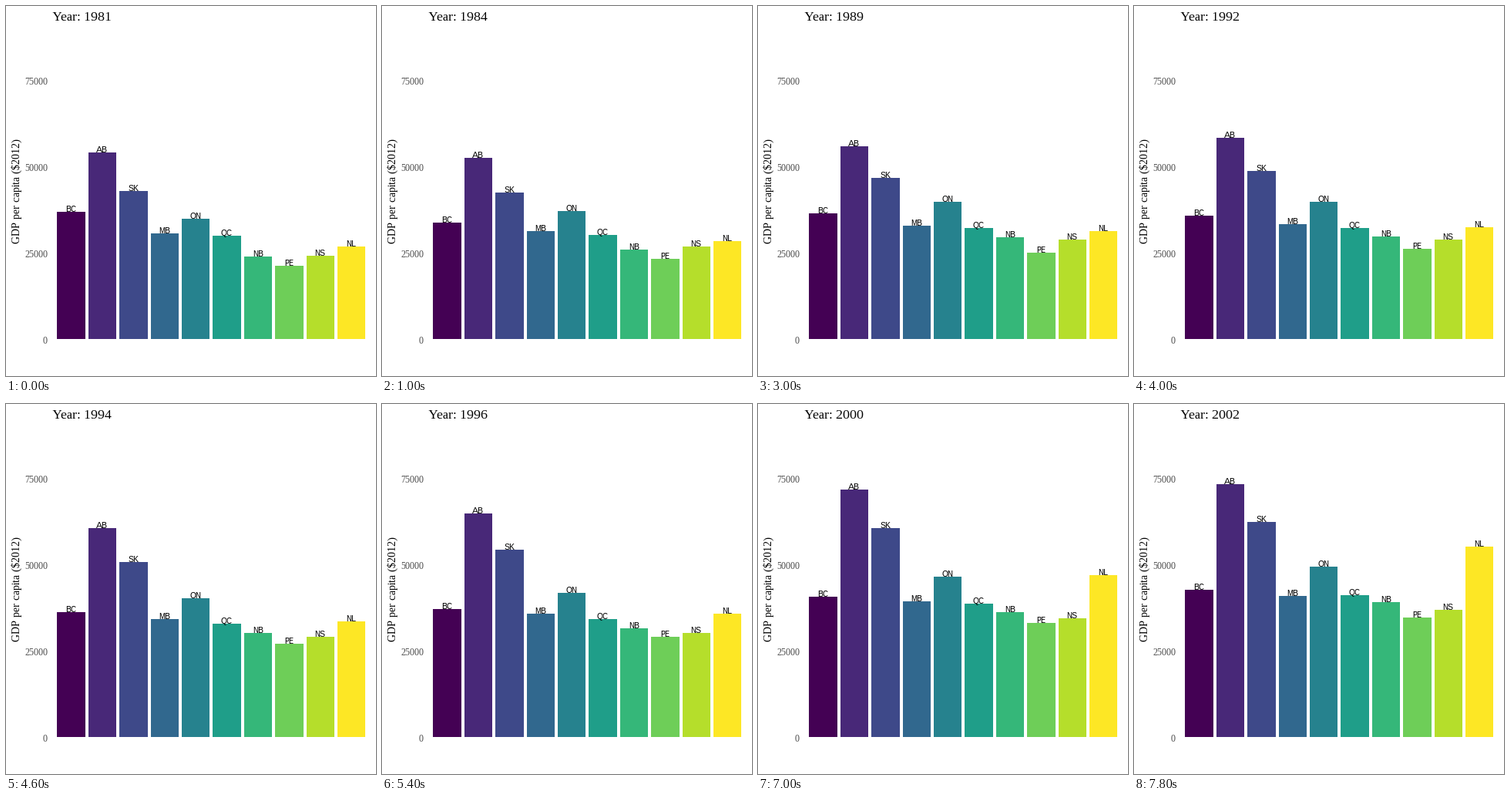
Write a matplotlib script that moves like this. It is 480 by 480 pixels and loops after 8 s.

```python
from math import ceil

import numpy as np
import matplotlib.pyplot as plt
from matplotlib.animation import FuncAnimation
from matplotlib.patches import Rectangle

# Whole-pixel glyphs with almost no kerning.
plt.rcParams.update({"text.hinting": "native", "text.hinting_factor": 1,
                     "text.kerning_factor": 6})

SIZE, DPI = 480, 80
FRAMES, STEP_MS = 40, 200
YEARS_PER_FRAME = 38 / 69
BASE = 432                      # y of the zero line, in pixels
FIRST_X, PITCH = 84.17, 40.39   # first bar centre and bar spacing
BAR_W = 0.9 * PITCH

# Bar heights in pixels at the turning points of the economy.
TURNS = [0, 5, 11, 31, 39]
HEIGHTS = {
    "BC": [165, 151, 167, 173, 191],
    "AB": [242, 235, 245, 314, 328],
    "SK": [192, 190, 204, 263, 279],
    "MB": [137, 140, 148, 170, 183],
    "ON": [156, 166, 181, 196, 221],
    "QC": [134, 135, 145, 162, 184],
    "NB": [107, 116, 133, 149, 175],
    "PE": [95, 104, 110, 140, 155],
    "NS": [108, 120, 131, 142, 165],
    "NL": [120, 127, 137, 173, 247],
}


def arch(k, start, end):
    """Half a sine wave between two frames, zero elsewhere."""
    return np.sin(np.pi * np.clip((k - start) / (end - start), 0, 1))


def bar_height(name, k):
    """Steady growth between turning points, less two shared recessions."""
    slump = 0.03 * arch(k, 0, 5) + 0.055 * arch(k, 11, 31)
    return np.interp(k, TURNS, HEIGHTS[name]) * (1 - slump)


fig = plt.figure(figsize=(SIZE / DPI, SIZE / DPI), dpi=DPI, facecolor="white")
ax = fig.add_axes([0, 0, 1, 1])
ax.set_xlim(0, SIZE)
ax.set_ylim(SIZE, 0)
ax.axis("off")


def put_text(x, y, text, px, font="Liberation Serif", **style):
    return ax.text(x, y, text, fontsize=px * 72 / DPI, family=font,
                   va="baseline", **style)


title = put_text(60, 19, "", 17)
put_text(18.5, 239.5, r"GDP per capita (\$2012)", 14, ha="center",
         rotation=90, rotation_mode="anchor")
for i in range(4):
    put_text(54, 438 - 112 * i, str(25000 * i), 12, ha="right",
             color="#4D4D4D")

bars, labels = {}, {}
colors = plt.cm.viridis(np.linspace(0, 1, len(HEIGHTS)))
for i, (name, color) in enumerate(zip(HEIGHTS, colors)):
    x = FIRST_X + PITCH * i
    left, right = ceil(x - BAR_W / 2), ceil(x + BAR_W / 2)
    bars[name] = ax.add_patch(Rectangle((left, BASE), right - left, 0,
                                        fc=color, lw=0, antialiased=False))
    labels[name] = put_text(x + 0.3, BASE, name, 11, "Liberation Sans",
                            ha="center", zorder=3)


def draw(k):
    title.set_text(f"Year: {round(1981 + k * YEARS_PER_FRAME)}")
    for name in HEIGHTS:
        h = round(bar_height(name, k))
        bars[name].set_height(-h)
        labels[name].set_y(BASE - h)
    return [title, *bars.values(), *labels.values()]


anim = FuncAnimation(fig, draw, frames=FRAMES, interval=STEP_MS,
                     repeat=True, repeat_delay=0, blit=False)
plt.show()
```
